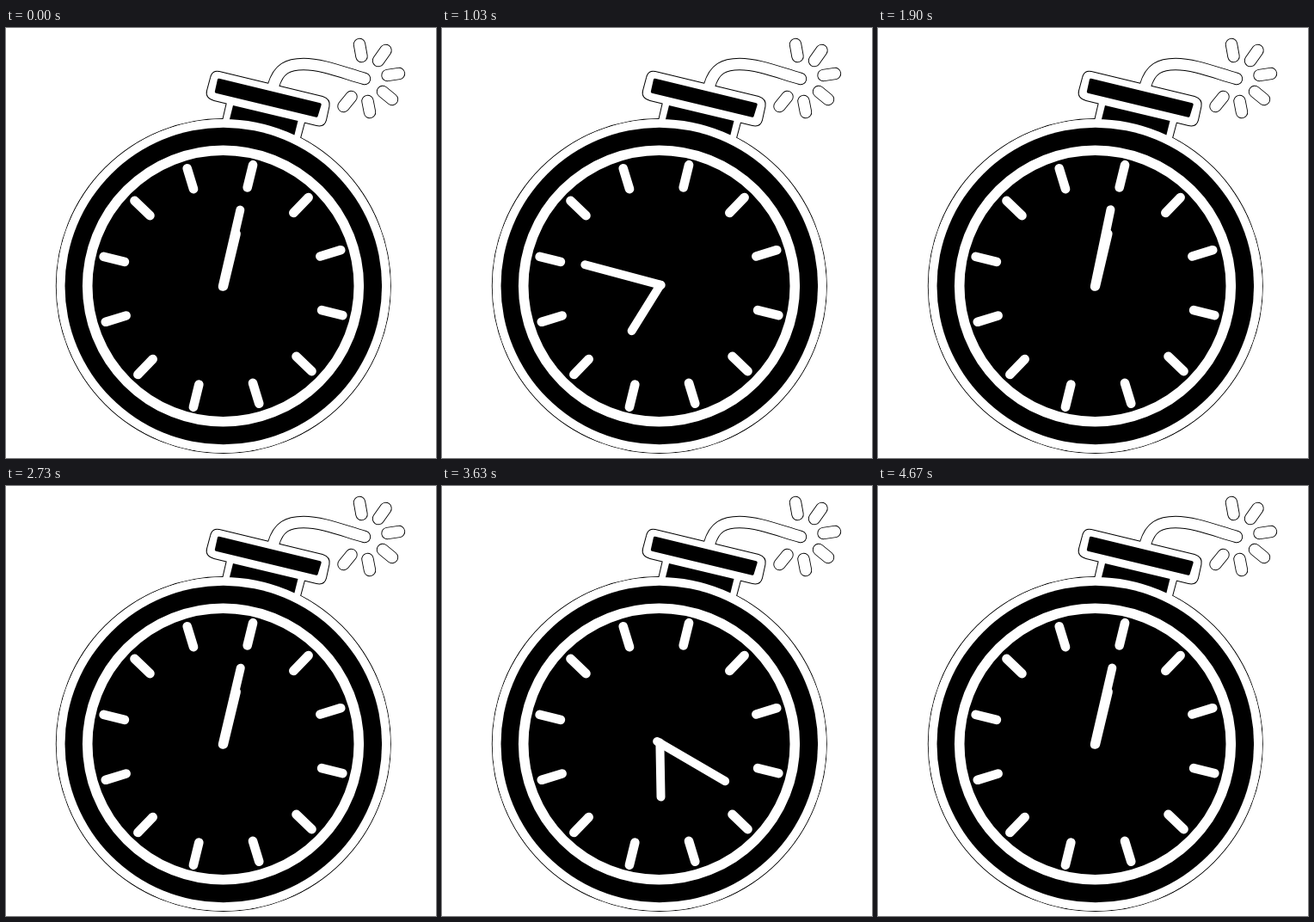
Recreate the animation shown at these times as an HTML page. Size 500 px wide and 500 px high, loop 5.41 s.

```html
<!DOCTYPE html>
<html lang="en">
<head>
<meta charset="utf-8">
<title>Stopwatch bomb</title>
<style>
  html, body { margin: 0; width: 100%; height: 100%; overflow: hidden; background: #fff; }
  svg { display: block; width: 100%; height: 100%; }
  .round { fill: none; stroke-linecap: round; stroke-linejoin: round; }
</style>
</head>
<body>
<svg viewBox="0 0 500 500">
  <defs>
    <g id="shell">
      <circle cx="252.800" cy="300" r="194"/>
      <path d="M258.500 80L251.500 110L341.500 130L348.500 104Z"/>
      <path d="M248 51L368 80Q377 83 375.500 91L372 107Q370 115 361 113L242 84Q232 81 234 73L238 58Q240 49 248 51Z"/>
    </g>
    <g id="lines" class="round">
      <path d="M311 67C317 47 328 42 346 42C368 42 392 52 417 59"/>
      <path d="M411 19L413.500 33M441.500 26L433 38M443.500 55L457 53M438 74L449 83M420.500 85L423 98M401.500 80L392.500 91"/>
    </g>
  </defs>
  <use href="#shell" fill="#000" stroke="#000" stroke-width="2"/>
  <use href="#lines" stroke="#000" stroke-width="14.400"/>
  <use href="#shell" fill="#fff"/>
  <use href="#lines" stroke="#fff" stroke-width="12.600"/>
  <path d="M264 90L339.500 108L333.500 132L258 114Z"/>
  <circle cx="252.800" cy="300" r="194" fill="#fff"/>
  <path class="round" style="fill:#000" stroke="#000" stroke-width="3.400" d="M247.500 60.500L365 89L361 102L244.500 74Z"/>
  <circle cx="252.800" cy="300" r="184.300"/>
  <circle cx="252.500" cy="300" r="157.800" fill="none" stroke="#fff" stroke-width="11.600"/>
  <g id="ticks" class="round" stroke="#fff" stroke-width="10.600"></g>
  <g class="round" stroke="#fff" stroke-width="10">
    <path id="long" d="M0 2.500V-89"/>
    <path id="short" d="M0 1V-62"/>
  </g>
</svg>
<script>
  const LOOP = 5410, STEP = 100 / 3, CYCLE_STEPS = 81;
  const HANDS = [
    { id: 'long', x: 252.3, y: 298.3, tilt: 13, turns: 5 },
    { id: 'short', x: 253.4, y: 299.5, tilt: 13.5, turns: 1 }
  ];

  // Eased progress: [step, value, slope per step]
  const EASE = [
    [0, 0, 0], [17, 0.1422, 0.0227], [28, 0.4596, 0.0317],
    [44, 0.8783, 0.0217], [51, 0.9853, 0.0043], [59, 1, 0]
  ];

  function progress(step) {
    const i = EASE.findIndex(key => step < key[0]);
    if (i < 0) return 1;
    const [t0, a, m0] = EASE[i - 1], [t1, b, m1] = EASE[i];
    const d = t1 - t0, x = (step - t0) / d, y = 1 - x;
    return a + (b - a) * x * x * (3 - 2 * x) + d * x * y * (m0 * y - m1 * x);
  }

  function draw(ms) {
    const t = Math.floor((ms % LOOP) / 10) * 10;
    const step = Math.floor((t + 5) / STEP);
    const p = progress(step % CYCLE_STEPS);
    for (const { id, x, y, tilt, turns } of HANDS) {
      document.getElementById(id).setAttribute('transform',
        `translate(${x} ${y}) rotate(${tilt + 360 * turns * p})`);
    }
  }

  const QUARTER = [13.8, 43.9, 73];
  document.getElementById('ticks').innerHTML = Array.from({ length: 12 }, (_, i) => {
    const angle = 90 * Math.floor(i / 3) + QUARTER[i % 3];
    const outer = i % 6 ? 143 : 145;
    return `<path d="M0 -118V-${outer}" transform="translate(252.500 300) rotate(${angle})"/>`;
  }).join('');

  const start = performance.now();
  function tick() {
    draw(performance.now() - start);
    requestAnimationFrame(tick);
  }
  tick();
</script>
</body>
</html>
```
